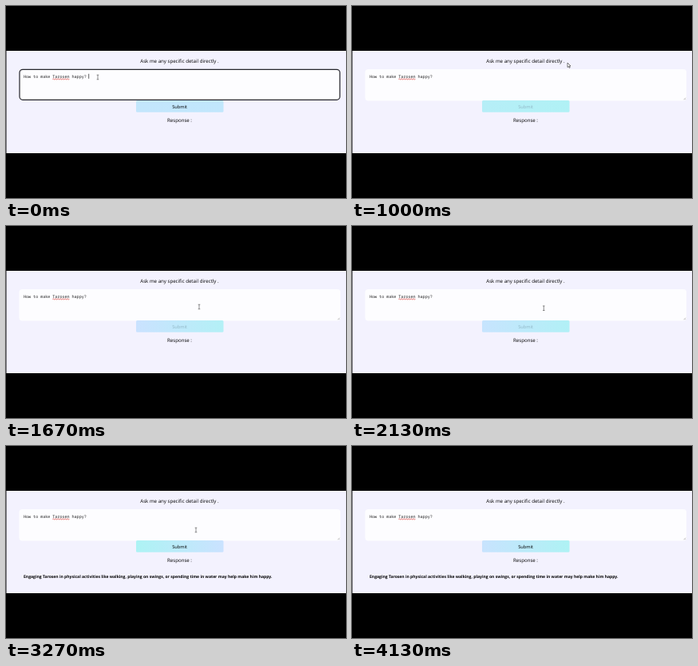
An HTML page for the animation above (4190 ms loop, 426 by 240 pixels).

```html
<!DOCTYPE html>
<html lang="en">
<head>
<meta charset="utf-8">
<title>Ask a question</title>
<style>
  html, body { margin: 0; width: 100%; height: 100%; overflow: hidden; background: #000; }
  svg { display: block; width: 100vw; height: 100vh; }
  text { font: 500 6.13px "Open Sans", sans-serif; fill: #000; text-rendering: geometricPrecision; }
  .mid { text-anchor: middle; }
  .mono { font: 5.06px "Noto Sans Mono", monospace; fill: #222; white-space: pre; }
  .answer { font-weight: 700; font-size: 5.05px; }
</style>
</head>
<body>
<svg viewBox="0 0 426 240">
  <defs>
    <linearGradient id="shine">
      <stop id="left"/><stop id="right" offset="1"/>
    </linearGradient>
  </defs>
  <rect x="0.5" y="56" width="425.5" height="128" fill="#f3f2fe"/>
  <text class="mid" x="217.5" y="70.9">Ask me any specific detail directly .</text>

  <rect id="blurred" x="16.5" y="79" width="402.5" height="39.5" rx="4" fill="#fdfdff"/>
  <path id="grip" d="M415.5 117.2l2.5-2.5M417 117.2l1-1" stroke="#888" stroke-width=".5"/>
  <rect id="focused" x="17" y="79.3" width="401.3" height="38" rx="4" fill="#fdfdff" stroke="#25252b" stroke-width="1.2"/>
  <text class="mono" x="22" y="89.6">How to make Tarosen happy?</text>
  <path d="M58.4 91.4q.75-1 1.5 0t1.5 0 1.5 0 1.5 0 1.5 0 1.5 0 1.5 0 1.5 0 1.5 0 1.5 0 1.5 0 1.5 0 1.5 0 1.5 0" fill="none" stroke="#d8403c" stroke-width=".8"/>
  <path id="caret" d="M0 84.8v6" stroke="#222" stroke-width=".7"/>

  <rect x="163" y="118" width="109.5" height="14.8" rx="1.5" fill="url(#shine)"/>
  <text id="submit" class="mid" x="217.6" y="127.7" style="font-size:5.7px">Submit</text>
  <text class="mid" x="217.5" y="144.9">Response :</text>
  <text id="answer" class="answer" x="22" y="164.6">Engaging Tarosen in physical activities like walking, playing on swings, or spending time in water may help make him happy.</text>

  <g id="cursor">
    <path id="beam" d="M-1.3-2.8h2.6M0-2.8v5.6M-1.3 2.8h2.6" stroke="#444" stroke-width=".6"/>
    <path id="arrow" d="M0-3v5.6l1.3-1.2 1 2 .9-.4-.9-2h1.7z" fill="#fff" stroke="#222" stroke-width=".6"/>
  </g>
</svg>
<script>
const $ = id => document.getElementById(id);
const LOOP = 4190, STEP = 1000 / 15;
const BLUR = 800, DONE = 2930, HIDE = 3730;

// Rows: time, then values to interpolate
const pointer = [
  [0, 115, 89], [330, 115, 89], [600, 106, 87], [735, 212, 126], [860, 218, 126],
  [1000, 270, 74], [1270, 270, 74], [1600, 242, 101], [1930, 242, 101], [2400, 238, 105], [LOOP, 238, 105]
];
// How blue the button is at its left and right end
const sheen = [
  [0, .75, .7], [600, .1, .15], [1000, .3, .1], [1670, 1, .2],
  [2600, .8, .1], [3270, 0, 1], [4130, .95, 0], [LOOP, .75, .7]
];

function at(rows, t) {
  const i = Math.max(1, rows.findIndex(r => r[0] >= t));
  const a = rows[i - 1], b = rows[i], k = (t - a[0]) / (b[0] - a[0]);
  return a.slice(1).map((v, n) => v + (b[n + 1] - v) * k);
}
const tint = k => `rgb(${173 + 29 * k},${243 - 17 * k},${244 + 11 * k})`;
const show = (id, on) => $(id).style.display = on ? "" : "none";

function draw(now) {
  const t = Math.floor((now % LOOP + 4) / STEP) * STEP;
  const focus = t < BLUR, busy = !focus && t < DONE;
  show("focused", focus);
  show("blurred", !focus);
  show("grip", !focus);
  show("caret", focus);
  $("caret").setAttribute("transform", `translate(${t < 530 ? 103.7 : 101.2} 0)`);
  $("submit").style.fill = busy ? "#91b7c6" : "#000";
  show("answer", t >= DONE);

  const [l, r] = at(sheen, t);
  $("left").setAttribute("stop-color", tint(l));
  $("right").setAttribute("stop-color", tint(r));

  const [x, y] = at(pointer, t);
  const inField = y > 79 && y < 118;
  $("cursor").setAttribute("transform", `translate(${x} ${y})`);
  show("cursor", t < HIDE);
  show("beam", inField);
  show("arrow", !inField);
}

const start = performance.now();
function tick() {
  draw(performance.now() - start);
  requestAnimationFrame(tick);
}
tick();
</script>
</body>
</html>
```
